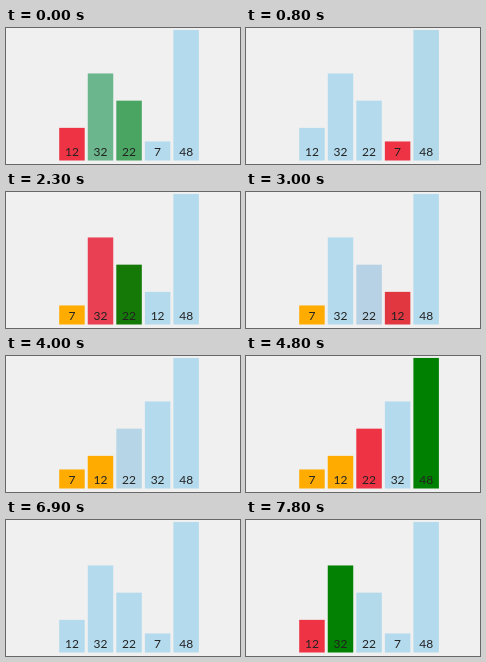
Animation, 234 px wide and 136 px high, one loop 7.9 s. Source, as an HTML page:

```html
<!DOCTYPE html>
<html lang="en">
<head>
<meta charset="utf-8">
<title>Selection sort</title>
<style>
  html, body { margin: 0; width: 100%; height: 100%; overflow: hidden; background: #f0f0f0; }
  svg { display: block; width: 100vw; height: 100vh; }
  text { font: 12px Lato, "Open Sans", sans-serif; text-anchor: middle; fill: #222; }
</style>
</head>
<body>
<svg id="stage" viewBox="0 0 234 136"></svg>
<script>
const LOOP = 7900;
const RESET = 6800;                            // hard cut back to the unsorted list
const PASS_TIMES = [-735, 1655, 3950, 5480, 6680];
const FADE = 260;
const VALUES = [12, 32, 22, 7, 48];
const COLORS = {
  idle: [180, 219, 237],
  min: [238, 51, 68],
  compare: [0, 128, 0],
  sorted: [255, 171, 0]
};
const LEFT = 53.2, PITCH = 28.55, WIDTH = 25.5, BASE = 132.5, UNIT = 2.72;

// Runs the sort once and records the look of every bar at each step.
function recordSteps() {
  const list = [...VALUES];
  const steps = [];
  let pass = [];
  const record = (sorted, min, compare) => {
    const bars = {};
    list.forEach((value, slot) => {
      const role = slot < sorted ? 'sorted'
        : slot === compare ? 'compare'
        : slot === min ? 'min' : 'idle';
      bars[value] = { slot, color: COLORS[role] };
    });
    pass.push({ bars });
  };

  record(0);
  steps.push({ ...pass[0], at: RESET - LOOP });
  for (let i = 0; i < list.length - 1; i++) {
    pass = [];
    let min = i;
    record(i, min);
    for (let j = i + 1; j < list.length; j++) {
      record(i, min, j);
      if (list[j] < list[min]) {
        min = j;
        record(i, min);
      }
    }
    [list[i], list[min]] = [list[min], list[i]];
    record(i, i);
    record(i + 1);

    const start = PASS_TIMES[i];
    const gap = (PASS_TIMES[i + 1] - start) / pass.length;
    pass.forEach((step, n) => steps.push({ ...step, at: start + n * gap }));
  }
  return steps;
}

const steps = recordSteps();
const stage = document.getElementById('stage');

function add(parent, name, attrs) {
  const node = document.createElementNS('http://www.w3.org/2000/svg', name);
  for (const key in attrs) node.setAttribute(key, attrs[key]);
  return parent.appendChild(node);
}

const bars = VALUES.map(value => {
  const group = add(stage, 'g', {});
  const height = value * UNIT;
  const rect = add(group, 'rect', { y: BASE - height, width: WIDTH, height });
  add(group, 'text', { x: WIDTH / 2, y: 127.7 }).textContent = value;
  return { value, group, rect };
});

const mix = (a, b, k) => a + (b - a) * k;
const ease = k => k < 0.5 ? 4 * k ** 3 : 1 - 4 * (1 - k) ** 3;

function draw(ms) {
  let time = ms % LOOP;
  if (time >= RESET) time -= LOOP;
  let index = 0;
  while (index + 1 < steps.length && steps[index + 1].at <= time) index++;
  const to = steps[index];
  const from = steps[Math.max(0, index - 1)];
  const k = ease(Math.min(1, (time - to.at) / FADE));

  for (const { value, group, rect } of bars) {
    const a = from.bars[value], b = to.bars[value];
    const x = LEFT + PITCH * mix(a.slot, b.slot, k);
    const rgb = a.color.map((c, n) => Math.round(mix(c, b.color[n], k)));
    group.setAttribute('transform', `translate(${x} 0)`);
    rect.setAttribute('fill', `rgb(${rgb})`);
  }
}

const origin = performance.now();
function tick() {
  draw(performance.now() - origin);
  requestAnimationFrame(tick);
}
tick();
</script>
</body>
</html>
```
